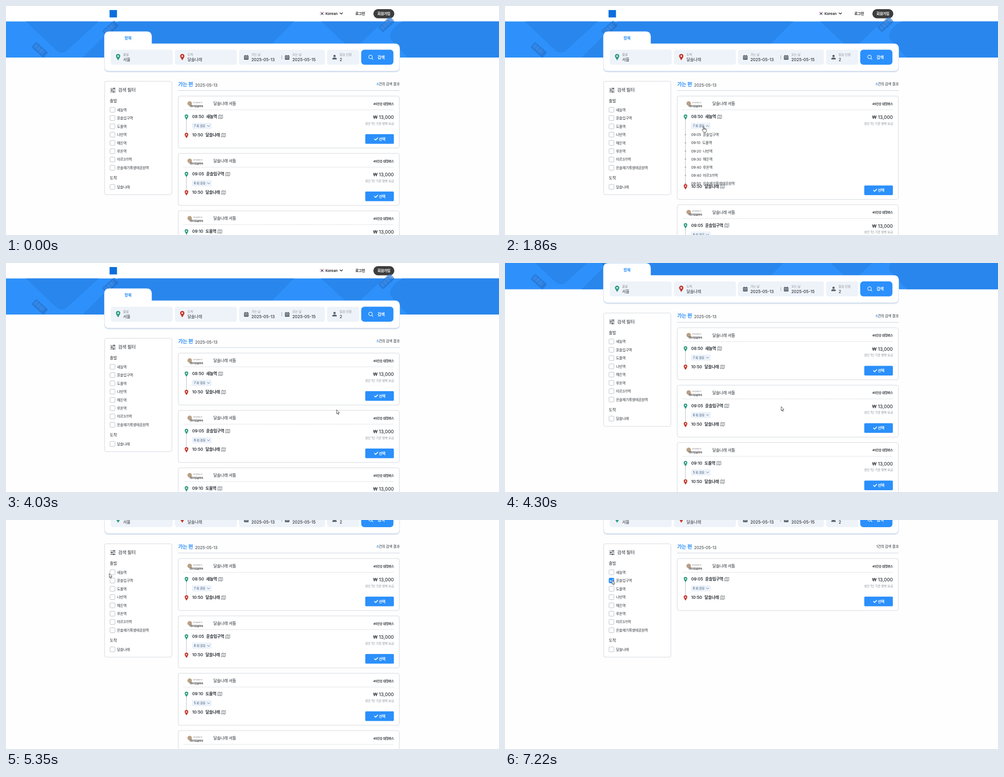
An HTML page that plays this animation: 1095x511 px, repeating every 8 s.

```html
<!DOCTYPE html>
<html lang="ko">
<head>
<meta charset="utf-8">
<title>셔틀 검색</title>
<style>
  html, body { margin: 0; width: 100%; height: 100%; overflow: hidden; background: #fff; }
  svg { display: block; width: 1095px; height: 511px; }
  text { font-family: Inter, 'Noto Sans CJK KR', 'Noto Sans CJK', sans-serif; white-space: pre; }
</style>
</head>
<body>
<svg id="stage" viewBox="0 0 1095 511"></svg>
<script>
const LOOP = 8000;
const BLUE = '#2b90fb', GREEN = '#2f9c82', RED = '#c4382d', INK = '#2f353b', GREY = '#8b9198';
const PARK = '달솔나래';
const STATIONS = ['새늘역', '윤솔입구역', '도율역', '나빈역', '해든역', '루온역', '미르3가역', '은솔재기록생태공원역'];
const TIMES = ['08:50', '09:05', '09:10', '09:20', '09:30', '09:40', '09:40', '09:50'];

// start ms, pointer, x, y, scroll, mode
const STEPS = [
  [0, '', 0, 0, 0, ''],
  [520, 'arrow', 622, 368, 0, ''],
  [780, 'arrow', 473, 321, 0, ''],
  [1050, 'arrow', 451, 281, 0, ''],
  [1330, 'hand', 437, 271, 0, ''],
  [1610, 'hand', 437, 268, 0, ''],
  [1860, 'hand', 437, 268, 0, 'open'],
  [2660, 'hand', 437, 268, 0, ''],
  [3210, 'hand', 440, 269, 0, ''],
  [3480, 'arrow', 492, 280, 0, ''],
  [3760, 'arrow', 775, 332, 0, ''],
  [4030, 'arrow', 734, 327, 0, ''],
  [4300, 'arrow', 613, 320, 56.4, ''],
  [4560, 'arrow', 559, 304, 115, ''],
  [4820, 'arrow', 336, 146, 115, ''],
  [5090, 'arrow', 259, 124, 115, ''],
  [5350, 'arrow', 229, 119, 115, ''],
  [5620, 'arrow', 227, 126, 115, ''],
  [5890, 'arrow', 227, 140, 115, ''],
  [6160, 'arrow', 237.5, 134, 115, ''],
  [7220, 'arrow', 237.5, 134, 115, 'filtered']
];

const group = (x, y, body, extra = '') => `<g transform="translate(${x} ${y}) ${extra}">${body}</g>`;
const rect = (x, y, w, h, r, fill, more = '') =>
  `<rect x="${x}" y="${y}" width="${w}" height="${h}" rx="${r}" fill="${fill}" ${more}/>`;
const circle = (x, y, r, fill, more = '') => `<circle cx="${x}" cy="${y}" r="${r}" fill="${fill}" ${more}/>`;
const path = (d, fill, more = '') => `<path d="${d}" fill="${fill}" ${more}/>`;
const line = (d, color, w = 1, more = '') =>
  path(d, 'none', `stroke="${color}" stroke-width="${w}" stroke-linecap="round" stroke-linejoin="round" ${more}`);
const frame = (x, y, w, h, r, color = '#d0d5dc') => rect(x, y, w, h, r, '#fff', `stroke="${color}" stroke-width="1"`);

function text(x, y, str, size, weight = 400, color = INK, anchor = 'start') {
  const spacing = /[가-힣]/.test(str) ? -0.037 * size : 0;
  return `<text x="${x}" y="${y}" font-size="${size}" font-weight="${weight}" fill="${color}" ` +
    `text-anchor="${anchor}" letter-spacing="${spacing}">${str}</text>`;
}

const pin = (x, y, color, scale = 1) => group(x, y,
  path('M0 6C-1.4 3.9-4-.1-4-1.9A4 4 0 0 1 4-1.9C4-.1 1.4 3.9 0 6Z', color) + circle(0, -1.8, 1.5, '#fff'), `scale(${scale})`);
const tick = (x, y, scale, w) =>
  group(x, y, line('M-3.2 0L-1 2.3L3.4-2.3', '#fff', w), `scale(${scale})`);
const chevron = (x, y, up, color, w = 0.9) =>
  line(up ? `M${x - 2.8} ${y + 1.4}l2.8-2.8l2.8 2.8` : `M${x - 2.8} ${y - 1.4}l2.8 2.8l2.8-2.8`, color, w);
const mapIcon = (x, y) => group(x, y,
  line('M.5 1.5L3.3.4L6.4 1.5L9.4.4V7.6L6.4 8.7L3.3 7.6L.5 8.7ZM3.3.4V7.6M6.4 1.5V8.7', '#555c63', 0.8));
const calendar = x => group(x, 109, rect(0, 1.5, 10, 9.5, 1.2, '#59626d') +
  line('M2.6.6V2.4M7.4.6V2.4', '#59626d', 1.3) + line('M1.5 4.5H8.5M2.4 7.4H4.3M5.8 7.4H7.6', '#eef3f9', 0.9));
const bus = (x, y, angle) => group(x, y,
  rect(-18, -8, 36, 16, 3, '#246fc9', 'opacity=".6"') + rect(-15, -5.5, 26, 10, 1.5, '#3a8be9', 'opacity=".7"') +
  line('M-8-8V8M0-8V8M8-8V8M13-6V6', '#1f62b5', 0.8, 'opacity=".7"'), `rotate(${angle})`);

function header() {
  return rect(0, 0, 1095, 34.5, 0, '#fff') +
    rect(230, 9, 16.5, 16.5, 0, '#0a6fdc') +
    rect(697, 13, 10, 7.5, 0.5, '#f4f4f6') + path('M699.8 16.7a2.2 2.2 0 0 1 4.4 0Z', '#cf3340') +
    path('M699.8 16.7a2.2 2.2 0 0 0 4.4 0Z', '#24488f') +
    line('M698 14.6l1-1M705 13.6l1 1M698 18.8l1 1M705 19.8l1-1', '#333', 0.9) +
    text(709.5, 19.6, 'Korean', 7.9, 600, '#222') + chevron(744.7, 16.7, false, '#222', 1.4) +
    text(776, 19.7, '로그인', 8, 600, '#222') +
    rect(816, 7, 46.5, 20.5, 10.2, '#3d3d3e') + text(839.2, 19.8, '회원가입', 8, 700, '#fff', 'middle');
}

function banner() {
  const dark = '#2986ed';
  return rect(0, 34.5, 1095, 80.5, 0, '#2e91fb') +
    path('M44 34.5L112 99Q124 109 136 99L206 34.5Z', dark) +
    path('M250 34.5L170 115H560L640 34.5Z', dark) +
    path('M700 34.5L770 100L838 34.5Z', dark) +
    path('M1095 34.5H880Q845 56 856 76L892 115H1095Z', dark) +
    bus(75, 98, 42) + bus(232, 50, -42) + bus(845, 41, -42);
}

function searchPanel() {
  const field = (x, w) => rect(x, 97.5, w, 33.5, 5, '#eef3f9');
  const entry = (x, label, value) => text(x, 111, label, 7, 400, GREY) + text(x, 123, value, 9.15, 500);
  const shape = 'M219 67Q219 57 229 57H313Q323 57 323 67V84H864Q874 84 874 94V135Q874 145 864 145H229Q219 145 219 135Z';
  return group(0, 2, path(shape, '#c3d3e8', 'stroke="#dbe5f2" stroke-width="2"')) +
    path(shape, '#fff', 'stroke="#dfe8f3" stroke-width=".6"') +
    text(271, 75, '왕복', 9, 600, BLUE, 'middle') +
    field(232.5, 138) + field(375, 138) + field(517.5, 191) + field(713, 71.5) +
    pin(249, 114, GREEN, 1.2) + entry(260, '출발', '서울') +
    pin(391.5, 114, RED, 1.2) + entry(403, '도착', PARK) +
    calendar(528.7) + entry(545, '가는 날', '2025-05-13') +
    line('M612.5 110.5V118.5', '#8b95a1', 0.8) +
    calendar(619.5) + entry(636, '오는 날', '2025-05-15') +
    circle(729.7, 111.6, 2.5, '#59626d') + path('M724.8 119.2V117.8Q724.8 115 729.7 115T734.6 117.8V119.2Z', '#59626d') +
    entry(741, '탑승 인원', '2') +
    rect(789, 97.5, 71.5, 33.5, 7, BLUE) +
    circle(809.6, 113.6, 4, 'none', 'stroke="#fff" stroke-width="1.2"') + line('M812.6 116.6L815 119', '#fff', 1.2) +
    text(825, 117.5, '검색', 9.1, 700, '#fff');
}

function filterPanel(checked) {
  const box = (y, name, on) =>
    rect(231, y - 5.5, 11, 11, 1.8, on ? BLUE : '#fff', `stroke="${on ? BLUE : '#b5bac0'}" stroke-width="1"`) +
    (on ? tick(236.5, y, 0.95, 1.4) : '') + text(246.5, y + 3, name, 8);
  const sliders = [[184, 240], [187.8, 235], [191.6, 239]].map(([y, x]) =>
    line(`M232 ${y}H243`, '#444b52', 1.1) + circle(x, y, 1.7, '#444b52')).join('');
  return frame(219, 168, 149.5, 253, 4) + sliders +
    text(249, 191, '검색 필터', 10.3, 500) + text(230.5, 215, '출발', 9, 500) +
    STATIONS.map((name, i) => box(231.6 + i * 18.48, name, i === checked)).join('') +
    text(230.5, 387.3, '도착', 9, 500) + box(403.6, PARK);
}

function stopRow(y, i) {
  return text(413.5, y, TIMES[i], 9.1, 600) + place(y, TIMES[i], STATIONS[i]);
}
function place(y, time, name) {
  const x = time.includes('1') ? 443 : 444.5;
  return text(x, y, name, 9.1, 600) + mapIcon(x + name.length * 8 + 3.2, y - 7.6);
}

// One result; coordinates are relative to the top of the card.
function card(y, i, open) {
  const grow = open ? 114.5 : 0;
  const stops = open ? STATIONS.slice(1).map((name, k) => {
    const sy = 86 + k * 18.2, time = TIMES[k + 1];
    return circle(400.7, sy, 1.5, '#a4a9af') + text(413.5, sy + 3.1, time, 8) +
      text(time === '09:10' ? 438.3 : 439.5, sy + 3.1, name, 8);
  }).join('') : '';
  return group(0, y,
    frame(382.5, 0, 491, 116 + grow, 4) +
    circle(408, 16.5, 5, '#b9a184') +
    text(416, 15.6, '즐거운여행시작', 3.2, 400, '#666') +
    text(408, 23.6, '(주)가온솔투어.', 4.9, 800, '#222') +
    text(460.5, 20.2, PARK + ' 셔틀', 9.1, 500) +
    text(861.5, 19.8, '45인승 대형버스', 6.8, 700, INK, 'end') +
    line('M394.5 30.7H861.5', '#c9ced4', 0.8, 'stroke-dasharray="1.6 1.6"') +
    line(`M400.7 52V${82 + grow}`, '#a4a9af', 0.8) +
    pin(400.9, 47, GREEN) + stopRow(49.2, i) +
    rect(413, 59.6, 43.8, 14, 2, '#edf3fb') +
    text(417.5, 69.2, `${7 - i} 회 경유`, 6.9, 500, '#48627f') + chevron(449.9, 66.6, open, '#48627f') + stops +
    pin(400.9, 88 + grow, RED) + text(413.5, 90.2 + grow, '10:50', 9.1, 600) + place(90.2 + grow, '10:50', PARK) +
    text(861.5, 51.2, '₩ 13,000', 10.3, 500, INK, 'end') +
    text(861.5, 63.6, '성인 1인 기준 왕복 요금', 6.9, 400, GREY, 'end') +
    rect(798, 85, 63.5, 21.5, 2, BLUE) .replace('y="85"', `y="${85 + grow}"`) +
    tick(822, 95.7 + grow, 1.05, 1.8) + text(828, 98.8 + grow, '선택', 8.2, 700, '#fff'));
}

function results(mode) {
  const single = mode === 'filtered', open = mode === 'open';
  const count = `<tspan fill="${single ? INK : BLUE}">${single ? 1 : 8}</tspan>건의 검색 결과`;
  const cards = single ? card(201, 1, false) :
    [0, 1, 2, 3].map(i => card(201 + i * 128 + (open && i ? 114.5 : 0), i, open && !i)).join('');
  return text(382.5, 178.7, '가는 편', 11.4, 600, BLUE) + text(420, 179.5, '2025-05-13', 8.9) +
    text(874, 177, count, 8, 400, INK, 'end') + line('M382.5 188.7H874', '#c8d1de', 1) + cards;
}

const POINTERS = {
  '': '',
  arrow: path('M.4.4V9.6L2.4 7.7L3.8 11L5.2 10.4L3.8 7.2H6.7Z', '#fff', 'stroke="#222" stroke-width=".8"'),
  hand: path('M3.3 8.6V1.6Q3.3.5 4.2.5T5.1 1.6V5.2Q6.4 4.6 6.8 5.6Q8 5.1 8.4 6.2Q10.2 5.8 10.3 7.4V10Q10.3 12 9 14H4.2' +
    'Q3.4 12.2 1 9.3Q.3 8.2 1.2 7.6Q2.2 7.2 3.3 8.6Z', '#fff', 'stroke="#222" stroke-width=".8" stroke-linejoin="round"') +
    line('M5.1 5.2V7.4M6.8 5.8V7.6M8.4 6.4V7.8', '#222', 0.7)
};

const stage = document.getElementById('stage');
let shown = null;

function draw() {
  const t = performance.now() % LOOP;
  const step = STEPS.findLast(s => s[0] <= t);
  if (step !== shown) {
    const [, pointer, x, y, scroll, mode] = shown = step;
    stage.innerHTML = rect(0, 0, 1095, 511, 0, '#fefefe') +
      group(0, -scroll, header() + banner() + searchPanel() +
        filterPanel(mode === 'filtered' ? 1 : -1) + results(mode)) +
      group(x, y, POINTERS[pointer]);
  }
  requestAnimationFrame(draw);
}
draw();
</script>
</body>
</html>
```
